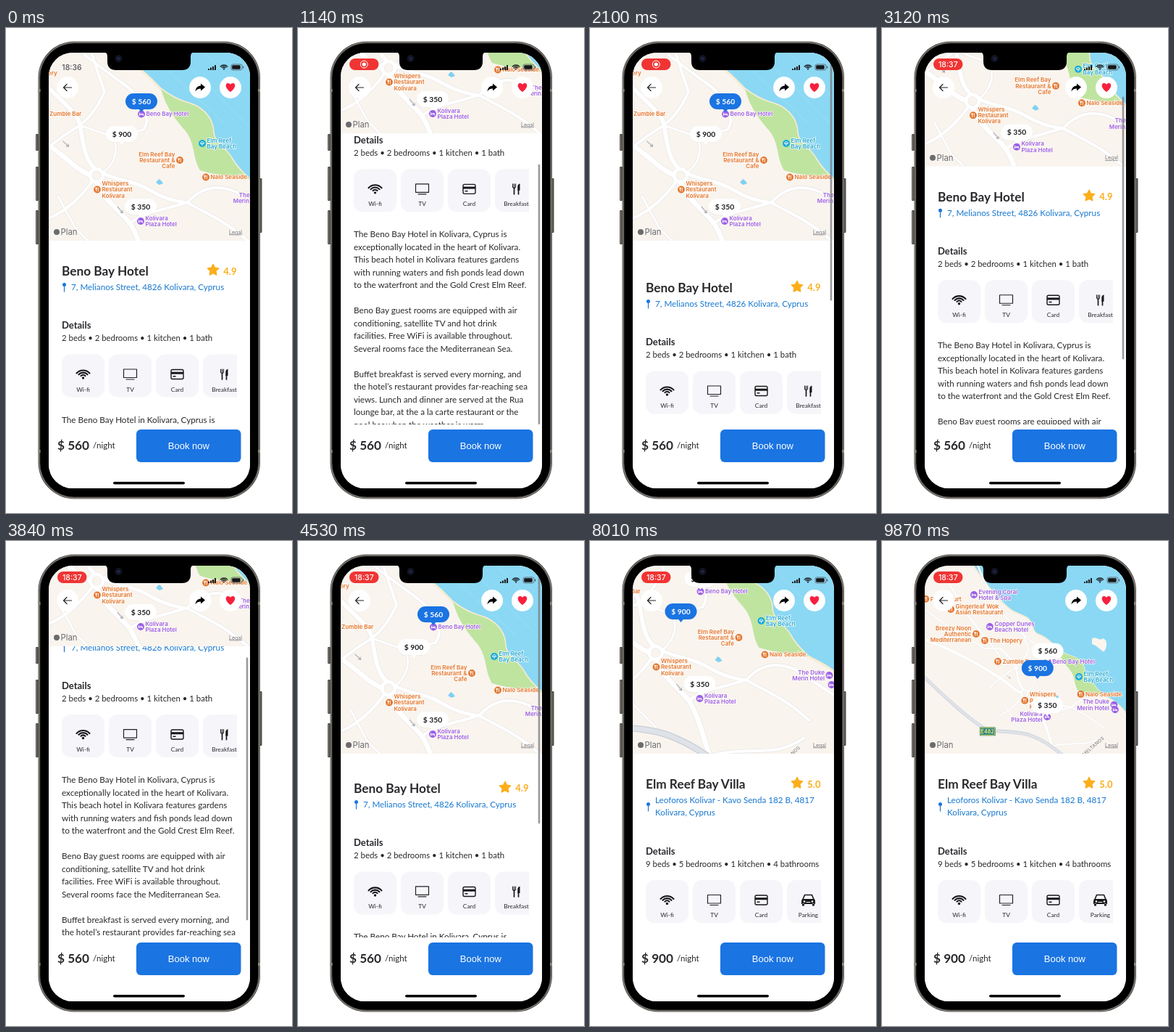
Recreate the animation shown at these times as an HTML page. Size 395x668 px, loop 9.9 s.

```html
<!DOCTYPE html>
<html lang="en">
<head>
<meta charset="utf-8">
<title>Hotel booking app</title>
<style>
html, body { margin: 0; width: 100%; height: 100%; overflow: hidden; background: #fff; }
svg { display: block; width: 395px; height: 668px; }
text { font-family: Lato, sans-serif; fill: #29292d; }
.b { font-weight: 700; }
.ui { font-family: Inter, sans-serif; }
.poi text { font: 600 8px Inter, sans-serif; stroke: #fffaf5; stroke-width: 1.6px; stroke-linejoin: round; paint-order: stroke; }
.mid { text-anchor: middle; }
.end { text-anchor: end; }
.line { fill: none; stroke-linecap: round; stroke-linejoin: round; }
</style>
</head>
<body>
<svg id="stage" viewBox="0 0 395 668" xmlns="http://www.w3.org/2000/svg"></svg>
<script>
const LOOP = 9900, SWITCH = 5600;
const BLUE = '#1a74e2', ORANGE = '#e2762f', PURPLE = '#9a5fe6', TEAL = '#15a9d8';
const $ = id => document.getElementById(id);
const txt = (x, y, size, s, cls = '', extra = '') =>
  `<text x="${x}" y="${y}" font-size="${size}" class="${cls}" ${extra}>${s}</text>`;
const line = (d, color, w, extra = '') =>
  `<path class="line" d="${d}" stroke="${color}" stroke-width="${w}" ${extra}/>`;
const rect = (x, y, w, h, r, fill, extra = '') =>
  `<rect x="${x}" y="${y}" width="${w}" height="${h}" rx="${r}" fill="${fill}" ${extra}/>`;
const at = (x, y, body, extra = '') => `<g transform="translate(${x} ${y})" ${extra}>${body}</g>`;

// Map places: x, y, label side (1 right, -1 left), colour, lines
const places = [
  [18.6, 62, 1, ORANGE, ['The Hopery']],
  [53.6, 118, 1, ORANGE, ['Zumble Bar']],
  [187, 118.5, 1, PURPLE, ['Beno Bay Hotel']],
  [240, 182, -1, ORANGE, ['Elm Reef Bay', 'Restaurant &amp;', 'Cafe']],
  [271, 159, 1, TEAL, ['Elm Reef', 'Bay Beach']],
  [276, 205.5, 1, ORANGE, ['Nalo Seaside']],
  [126, 222.5, 1, ORANGE, ['Whispers', 'Restaurant', 'Kolivara']],
  [186, 266, 1, PURPLE, ['Kolivara', 'Plaza Hotel']],
  [365, 234, -1, PURPLE, ['The Duke', 'Merin Hotel']],
  [368, 247, 1, PURPLE, []],
  [-10.5, -60.4, 1, PURPLE, ['Evening Coral', 'Hotel &amp; Spa']],
  [-72.6, -21.6, 1, ORANGE, ['Gingerleaf Wok', 'Asian Restaurant']],
  [32, 25, 1, PURPLE, ['Copper Dunes', 'Beach Hotel']],
  [-4.7, 44.5, -1, ORANGE, ['Breezy Noon', 'Authentic', 'Mediterranean']],
  [-140, -49, 1, ORANGE, ['Palm Court']]
];
const CAFE = 3, PLAZA = 7;
const glyphs = {
  [ORANGE]: 'M-1.3 -2.4V2.4M-2.2 -2.4V-.8H-.4V-2.4M1.4 2.4V-2.4',
  [PURPLE]: 'M-2.6 -1.6V2M-2.6 .9H2.6V2M-1 -.3H2.3V.8',
  [TEAL]: 'M-2.5 0A2.5 2.4 0 0 1 2.5 0ZM0 0V2.8'
};
const poi = ([x, y, side, color, lines], i) => {
  const label = dir => lines.map((s, n) =>
    txt(dir * 6.5, 2.9 + (n - (lines.length - 1) / 2) * 8.3, 8, s, dir < 0 ? 'end' : '', `style="fill:${color}"`)).join('');
  const sides = i === PLAZA
    ? `<g id="plazaR">${label(1)}</g><g id="plazaL">${label(-1)}</g>` : label(side);
  return `<g id="poi${i}"><circle r="4.9" fill="${color}"/>${line(glyphs[color], '#fff', .9)}${sides}</g>`;
};

const pins = [[187, 112, 560], [186, 257, 350], [160, 157, 900]];
const pin = ([x, y, price], i) => `<g id="pin${i}">
  ${rect(-22, -21.4, 44, 22, 11, '#000', 'opacity=".06"')}
  <g id="pinFill${i}"><rect x="-22" y="-22" width="44" height="22" rx="11"/><path d="M-4 -1H4L0 4Z"/></g>
  ${txt(0, -7.4, 10.3, '$ ' + price, 'b mid', `id="pinText${i}"`)}</g>`;

const coast = 'M-20 -150C20 -90 55 -45 89 -20C112 -6 136 -4 143 14C150 34 150 42 168 48C186 54 200 70 214 84C230 96 240 100 250 103C270 108 284 122 286 140C286 160 302 162 312 180C320 194 328 200 336 208C350 216 372 222 400 258';
const roads = [
  ['M59 82C75 100 96 114 102 132C106 155 108 180 122 193', 6],
  ['M30 190C50 170 72 152 102 134C118 122 128 106 136 88L118 34', 4],
  ['M-140 60C-60 90 10 130 59 162C84 178 98 196 116 202', 7],
  ['M126 213C134 236 158 252 172 270C186 294 190 318 200 345', 7],
  ['M134 200C160 212 176 210 196 222C216 234 232 238 250 241', 5],
  ['M172 268C196 252 222 250 250 240C268 252 300 262 337 296', 4],
  ['M59 262C84 252 104 232 120 210', 4],
  ['M59 104C42 80 10 42 -30 -10L-100 -130', 5],
  ['M102 134L148 150L190 140', 3],
  ['M148 150C158 172 146 190 134 200', 3],
  ['M-140 -20C-90 20 -40 50 20 84L60 84', 4],
  ['M72 232L96 276L126 306', 3],
  ['M190 140C202 122 190 96 158 74L112 40C70 0 30 -60 0 -138', 4],
  ['M250 241C268 220 290 214 318 226L400 280', 4],
  ['M200 345C250 330 290 350 330 320', 4]
];
const highway = 'M-150 154C-90 212 -30 268 26 303C60 306 110 304 144 317C176 329 210 350 250 390';
const arrow = (x, y, a) => `<g transform="translate(${x} ${y}) rotate(${a})">${line('M-6 0H5M2 -2L5 0L2 2', '#a4a6ae', 1)}</g>`;

const world = `<path d="${coast}L560 258V-320H-20Z" fill="#8bd8f4"/>
  ${line('M240 40L340 140M270 30L350 110M225 60L300 130', '#a6e1f6', 1, 'opacity=".6"')}
  ${line(coast, '#f6ecd0', 3)}
  <path d="M214 84C230 96 240 100 250 103C270 108 284 122 286 140C286 160 302 162 312 180C320 194 328 200 336 208C314 205 292 203 268 196C257 178 262 160 248 142C236 128 222 112 214 84Z" fill="#bfe4a0"/>
  <path id="isle" d="M306 58C316 48 324 66 336 56C350 62 346 82 338 92C324 84 318 74 306 72Z" fill="#fbf5ee"/>
  <path d="M207 213L211 208L214 210L217 214L212 216Z" fill="#7fd0f2"/>
  ${roads.map(([d, w]) => line(d, '#e6e3e3', w + 1.2)).join('')}
  <circle cx="125" cy="203" r="9" fill="none" stroke="#e6e3e3" stroke-width="6.2"/>
  ${roads.map(([d, w]) => line(d, '#fff', w)).join('')}
  <circle cx="125" cy="203" r="9" fill="none" stroke="#fff" stroke-width="5"/>
  ${line(highway, '#c3c8d0', 9)}${line(highway, '#dfe3e9', 7)}
  ${arrow(83, 160, 42)}${arrow(158, 251, 50)}`;

// Amenity icons, centred on the origin
const wifi = k => [9, 6, 3].map(r => line(`M${-r * k} ${(-r * .62 + 4) * k}A${r * 1.35 * k} ${r * 1.35 * k} 0 0 1 ${r * k} ${(-r * .62 + 4) * k}`, '#17171a', 2.1 * k)).join('') +
  `<circle cy="${5 * k}" r="${1.7 * k}" fill="#17171a"/>`;
const icons = {
  'Wi-fi': wifi(1),
  TV: line('M-9 -7H9V4.500H-9ZM-5.500 7H5.500', '#222', 1.2),
  Card: rect(-8.5, -6.5, 17, 13, 2, 'none', 'stroke="#17171a" stroke-width="1.4"') + rect(-8.5, -3.3, 17, 3, 0, '#17171a') + rect(-6, 2, 4, 1.5, 0, '#17171a'),
  Breakfast: line('M-3 -1V7M3 1V7', '#17171a', 1.7) + line('M-5 -7V-2.500Q-3 0 -1 -2.500V-7M-3 -7V-1', '#17171a', 1.1) +
    '<path d="M1.800 2V-4Q2.200 -7 5 -7.500V2Z" fill="#17171a"/>',
  Parking: line('M-7.500 -1L-5 -7H5L7.500 -1', '#17171a', 1.6) +
    '<path d="M-8.500 -1.500H8.500Q9.500 0 9.500 2V5.500H-9.500V2Q-9.500 0 -8.500 -1.500ZM-8.500 5V8H-5.500V5ZM5.500 5V8H8.500V5Z" fill="#17171a"/>' +
    '<circle cx="-5.500" cy="2" r="1.300" fill="#fff"/><circle cx="5.500" cy="2" r="1.300" fill="#fff"/>' + line('M-2.500 3H2.500', '#fff', 1)
};
const tile = (name, i) => at(77 + i * 65, 0, rect(0, 0, 59, 59, 12, '#f6f5f9') +
  at(29.5, 27.5, icons[name]) + txt(29.5, 51, 8.4, name, 'mid'));
const star = () => {
  const p = Array.from({ length: 10 }, (_, i) => {
    const r = i % 2 ? 4 : 8, a = i * Math.PI / 5;
    return [r * Math.sin(a), -r * Math.cos(a)].map(v => v.toFixed(2)).join(',');
  });
  return `<polygon points="${p.join(' ')}" fill="#fcae1b" stroke="#fcae1b" stroke-width="1.5" stroke-linejoin="round"/>`;
};
const about = `The Beno Bay Hotel in Kolivara, Cyprus is
exceptionally located in the heart of Kolivara.
This beach hotel in Kolivara features gardens
with running waters and fish ponds lead down
to the waterfront and the Gold Crest Elm Reef.

Beno Bay guest rooms are equipped with air
conditioning, satellite TV and hot drink
facilities. Free WiFi is available throughout.
Several rooms face the Mediterranean Sea.

Buffet breakfast is served every morning, and
the hotel’s restaurant provides far-reaching sea
views. Lunch and dinner are served at the Rua
lounge bar, at the a la carte restaurant or the
pool bar when the weather is warm.`.split('\n');

const sheet = (id, h) => `<g id="${id}">
  ${txt(77, 341, 17.3, h.name, 'b')}${at(286, 333.5, star())}
  ${txt(318.5, 339.5, 13, h.rate, 'b end', 'style="fill:#fcae1b"')}
  ${at(80.5, h.pinY, `<circle cy="-3.500" r="2.500" fill="${BLUE}"/>` + line('M0 -2V6', BLUE, 1.2))}
  ${h.address.map((s, i) => txt(90, h.addrY + i * 17.5, 11.7, s, '', 'style="fill:#1878cf"')).join('')}
  ${at(0, h.shift, txt(77, 414, 13, 'Details', 'b') + txt(77, 431, 11.4, h.rooms) +
    `<g clip-path="url(#row)">${at(0, 449.5, h.tiles.map(tile).join(''))}</g>`)}
  ${h.about.map((s, i) => txt(77, 543.5 + i * 17.5, 11.7, s)).join('')}</g>`;

const hotel = {
  name: 'Beno Bay Hotel', rate: '4.9', pinY: 357, addrY: 361, shift: 0,
  address: ['7, Melianos Street, 4826 Kolivara, Cyprus'],
  rooms: '2 beds • 2 bedrooms • 1 kitchen • 1 bath',
  tiles: ['Wi-fi', 'TV', 'Card', 'Breakfast'], about
};
const villa = {
  name: 'Elm Reef Bay Villa', rate: '5.0', pinY: 366, addrY: 360.5, shift: 17.5,
  address: ['Leoforos Kolivar - Kavo Senda 182 B, 4817', 'Kolivara, Cyprus'],
  rooms: '9 beds • 5 bedrooms • 1 kitchen • 4 bathrooms',
  tiles: ['Wi-fi', 'TV', 'Card', 'Parking'], about: []
};

const disc = (x, body) => at(x, 82, '<circle r="15" fill="#fff"/>' + body);
const sideKey = (x, y, h) => rect(x, y, 4, h, 1.2, '#4b4845') + rect(x + 1, y + 1, 1, h - 2, .5, '#8d8883');

$('stage').innerHTML = `
<defs>
  <clipPath id="screen"><rect x="59" y="34" width="278" height="600" rx="33"/></clipPath>
  <clipPath id="mapBox"><rect x="59" y="34" width="278" height="259"/></clipPath>
  <clipPath id="body"><rect x="59" y="34" width="278" height="512"/></clipPath>
  <clipPath id="row"><rect x="77" y="440" width="242" height="80"/></clipPath>
</defs>
${sideKey(41, 146, 23)}${sideKey(41, 191, 47)}${sideKey(41, 251, 47)}${sideKey(349.5, 207, 75)}
${rect(44.5, 18.5, 306.5, 630, 50, '#3a3835')}
${rect(45.7, 19.7, 304.1, 627.6, 49, 'none', 'stroke="#a19c95" stroke-width="1"')}
${rect(47.5, 21.5, 300.5, 624, 47, '#000')}
${rect(44.5, 84, 3, 4, 0, '#8a8782')}${rect(348, 84, 3, 4, 0, '#8a8782')}
${rect(44.5, 581, 3, 4, 0, '#8a8782')}${rect(348, 581, 3, 4, 0, '#8a8782')}
<g clip-path="url(#screen)">
  ${rect(59, 34, 278, 600, 0, '#fff')}
  <g clip-path="url(#body)"><g id="content">${sheet('hotel', hotel)}${sheet('villa', villa)}</g></g>
  <g id="header"><g clip-path="url(#mapBox)">
    ${rect(59, 34, 278, 259, 0, '#f9f4ee')}
    <g id="world">${world}</g>
    <g class="poi">${places.map(poi).join('')}</g>
    <g id="shield">${rect(-11, -6, 22, 12, 1.5, '#1d7e8d')}${rect(-10, -5, 20, 10, 1, 'none', 'stroke="#ead94c" stroke-width="1"')}
      ${txt(0, 2.6, 7, 'E482', 'ui b mid', 'style="fill:#f7ea6a"')}</g>
    <g id="street">${txt(0, 2, 6.5, 'MELTANOS', 'ui mid', 'transform="rotate(-41)" letter-spacing=".3" style="fill:#77757a"')}</g>
    ${pins.map(pin).join('')}
    <circle cx="70" cy="281" r="4" fill="#6b6b6f"/>
    ${txt(75.5, 285, 11.3, 'Plan', 'ui', 'style="fill:#6b6b6f"')}
    ${txt(326, 283.5, 7, 'Legal', 'ui end', 'text-decoration="underline" style="fill:#77757a"')}
  </g></g>
  ${disc(85, line('M5.500 0H-5M-1 -4.500L-5.500 0L-1 4.500', '#222', 1.2))}
  ${disc(268, '<path d="M1 -5.500L7 -.5L1 4.500V1.600C-3 1.600 -5 3 -6.500 5.500C-6 0 -3 -2.300 1 -2.600Z" fill="#000"/>')}
  ${disc(310, '<path d="M0 6C-8.500 0 -7 -6 -3.300 -6C-1.300 -6 0 -4.600 0 -4C0 -4.600 1.300 -6 3.300 -6C7 -6 8.500 0 0 6Z" fill="#f7213d"/>')}
  <g id="bar"><rect id="thumb" x="331.7" width="2.6" rx="1.3" fill="#77777c" opacity=".75"/></g>
  ${rect(59, 546, 278, 88, 0, '#fff')}
  ${txt(71, 581, 17.2, '', 'b', 'id="price"')}${txt(120, 579, 11.6, '/night')}
  ${rect(180, 553, 144.5, 45, 6, BLUE)}
  ${txt(252.3, 580, 13, 'Book now', 'mid', 'style="font-family:\'Liberation Sans\',sans-serif;fill:#fff"')}
  ${rect(148, 625, 99, 3.6, 1.8, '#000')}
  ${txt(91, 57.5, 10.5, '18:36', 'ui mid', 'id="clock" font-weight="500" style="fill:#55555a"')}
  <g id="pill">${rect(71, 42, 40.5, 16, 8, '#f03434')}
    <g id="rec"><circle cx="91.300" cy="50" r="5" fill="none" stroke="#fff"/><circle cx="91.300" cy="50" r="2.600" fill="#fff"/></g>
    ${txt(91.3, 53.8, 10.5, '18:37', 'ui mid', 'id="late" font-weight="500" style="fill:#fff"')}</g>
  ${[2, 3.5, 5, 7].map((h, i) => rect(279 + i * 3, 58 - h, 2, h, .5, '#17171a')).join('')}
  ${at(301, 54, wifi(.55))}
  ${rect(311, 50, 15, 8, 2.4, 'none', 'stroke="#55585c" stroke-width=".8"')}${rect(312.2, 51.2, 11.5, 5.6, 1.4, '#17171a')}${rect(327, 52.5, 1.2, 3, .5, '#55585c')}
</g>
<path d="M134 33Q140 33 140 39V46Q140 58 152 58H243Q255 58 255 46V39Q255 33 261 33Z" fill="#000"/>
<circle cx="155.500" cy="42" r="5" fill="#11131f"/><circle cx="155.500" cy="42" r="2" fill="#1f2850"/>`;

const scrollKeys = [[0, 0], [60, 0], [500, 130], [1140, 255], [1400, 282], [1560, 282], [1900, 40], [2100, -23],
  [2420, 0], [2700, 0], [3120, 102], [3480, 215], [3800, 215], [4200, 20], [4380, -22], [4530, -6], [4850, 0],
  [6300, 0], [6650, -14], [7050, 0], [LOOP, 0]];

// Monotone cubic through the keys, flat at every turning point
function curve(keys, t) {
  const rate = i => keys[i + 1] ? (keys[i + 1][1] - keys[i][1]) / (keys[i + 1][0] - keys[i][0]) : 0;
  const slope = i => {
    const a = i ? rate(i - 1) : 0, b = rate(i);
    return a * b > 0 ? 2 * a * b / (a + b) : 0;
  };
  let i = 0;
  while (i < keys.length - 2 && t >= keys[i + 1][0]) i++;
  const [t0, a] = keys[i], [t1, b] = keys[i + 1], d = t1 - t0, u = (t - t0) / d, v = 1 - u;
  return a * v * v * (1 + 2 * u) + b * u * u * (3 - 2 * u) + d * u * v * (slope(i) * v - slope(i + 1) * u);
}
const ramp = (t, a, b) => Math.min(1, Math.max(0, (t - a) / (b - a)));
const ease = u => u * u * (3 - 2 * u);
const show = (id, on) => $(id).setAttribute('visibility', on ? 'inherit' : 'hidden');
const move = (id, x, y, k) => $(id).setAttribute('transform', `translate(${x} ${y})` + (k ? ` scale(${k})` : ''));

function draw(t) {
  const s = curve(scrollKeys, t), second = t >= SWITCH;
  move('content', 0, -s);
  move('header', 0, -Math.min(148, Math.max(0, s)));
  show('hotel', !second);
  show('villa', second);
  $('price').textContent = second ? '$ 900' : '$ 560';

  const pan = ease(ramp(t, 7250, 7980)), zoom = ease(ramp(t, 8230, 9840));
  const k = Math.pow(.515, zoom), out = (1 - k) / .485;
  const tx = -34.5 * pan + 166.9 * out, ty = -49 * pan + 154.1 * out;
  const place = (id, x, y) => move(id, x * k + tx, y * k + ty);
  move('world', tx, ty, k);
  places.forEach(([x, y], i) => place('poi' + i, x, y));
  pins.forEach(([x, y, price], i) => {
    const on = price === (second ? 900 : 560);
    place('pin' + i, x, y);
    $('pinFill' + i).setAttribute('fill', on ? BLUE : '#fff');
    $('pinText' + i).style.fill = on ? '#fff' : '#1d1d20';
  });
  place('shield', 26, 305);
  place('street', 310, 345);
  show('poi' + CAFE, k > .75);
  show('plazaR', k > .7);
  show('plazaL', k <= .7);
  $('isle').setAttribute('opacity', ramp(k, .8, .6));

  const top = 32 + .61 * Math.max(0, s), end = s < 0 ? 394 + .8 * s : top + 362;
  $('thumb').setAttribute('y', Math.max(36, top));
  $('thumb').setAttribute('height', Math.min(546, end) - Math.max(36, top));
  $('bar').setAttribute('opacity', ramp(t, 60, 180) * (1 - ramp(t, 5190, 5400)));

  show('clock', t < 600);
  show('pill', t >= 600);
  show('rec', t >= 600 && t < 2600);
  show('late', t >= 2600);
}

function tick() {
  draw(performance.now() % LOOP);
  requestAnimationFrame(tick);
}
tick();
</script>
</body>
</html>
```
